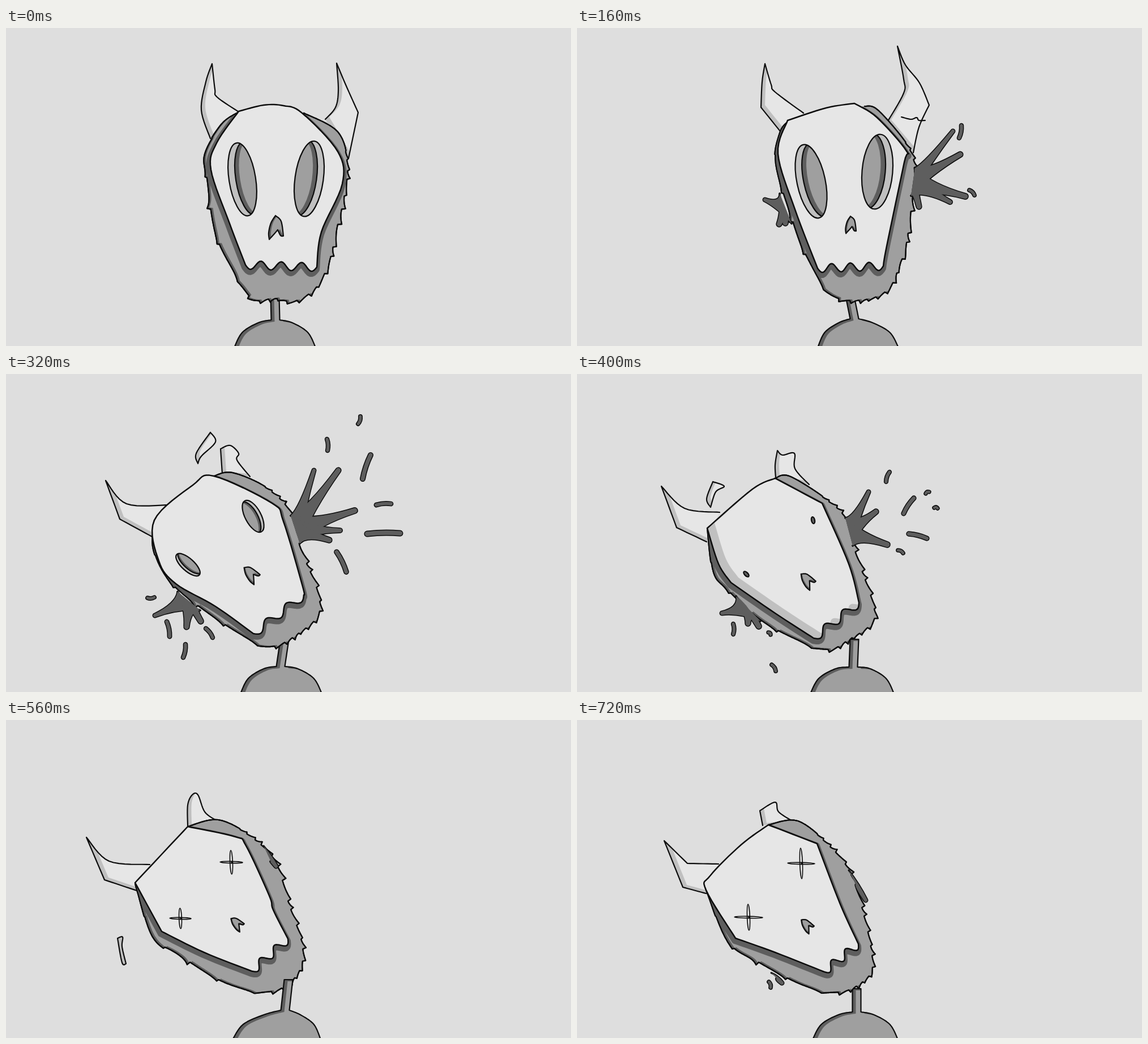
An HTML page with a canvas that plays this animation: 998x561 px, repeating every 0.8 s.

```html
<!DOCTYPE html>
<html lang="en">
<head>
<meta charset="utf-8">
<title>Horned skull</title>
<style>
html, body { margin: 0; width: 100%; height: 100%; overflow: hidden; background: #dedede; }
canvas { display: block; width: 100vw; height: 100vh; }
</style>
</head>
<body>
<canvas id="stage" width="998" height="561"></canvas>
<script>
const ctx = document.getElementById('stage').getContext('2d');
const INK = '#0c0c0c', BONE = '#e6e6e6', SHADE = '#c0c0c0', FUR = '#9f9f9f', DARK = '#5e5e5e';
const STEP = 80;
const NOSE = '0,-22! 10,-12 14,14! 9,13 4,3! -2,10 -11,20! -12,8 -8,-9 0,-22';

// Curves are a few "x,y" key points; "!" marks a sharp corner.
// mask: left mouth corner over the crown to the right one.   fur: right of the crown round to the left.
// body: left, right, neck foot x y, neck top x y.   nose: x, y, size, degrees.
// eye: x, y, rx, ry, degrees, rim shift.   cross: x, y, half width, half height.
// blood: two base points, then arm tips.   drops: tail and head in turn.
const calm = {
  hornL: '411,148 373,122 369,108 364,63! 353,95 345,145 361,195',
  hornR: '564,161 582,140 587,110 584,62! 600,100 622,149! 605,230',
  body: [403, 547, 476, 515, 475, 474],
  fur: '526,150 586,183 604,240 598,300 585,355 572,412 549,458 510,483 475,478 437,480 410,443 370,366 354,265 350,222 380,170 411,148',
  mask: '423,418 395,345 362,250 372,203 411,147! 455,136 490,137 523,150 586,218 594,275 557,360 549,422',
  teeth: 7,
  nose: [476, 353, 1, 0],
  eyeL: [417.5, 267, 23.5, 65, -9, 12],
  eyeR: [535.5, 266, 25, 67, 8, -12]
};

const struck = {
  hornL: '400,150 350,113 343,100 332,63! 327,95 325,140! 362,186',
  hornR: '548,166 577,115 577,90 566,32! 580,65 605,97 622,136! 604,175 594,220',
  crack: '573,157 590,161 600,158 604,163 615,163',
  body: [425, 568, 490, 513, 483, 478],
  fur: '508,138 532,145 585,208 597,250 590,330 581,390 572,415 552,460 510,480 450,472 403,400 378,335 350,240 358,185 372,165',
  mask: '425,424 385,320 355,222 372,163! 440,141 490,133! 530,158 582,217 578,237 547,385 541,420',
  teeth: 7,
  nose: [483, 348, 0.72, 0],
  eyeL: [413.5, 270.5, 25, 66, -12, 12],
  eyeR: [530.5, 253.5, 27, 66, 5, -13],
  blood: ['358,292 379,345 332,303 357,346 368,344', '597,247 590,296 664,182 677,223 686,297 659,307 604,315'],
  drops: '679,172 675,194 693,286 702,295'
};

const burst = {
  hornL: '340,192 295,172 254,124! 264,192! 307,237',
  hornR: '497,148 505,124! 527,128! 541,152 534,190',
  chip: '507,124! 509,110 484,44! 505,68 544,116! 530,127 507,124',
  body: [417, 546, 488, 514, 489, 478],
  fur: '450,144 465,139 492,143 540,195 550,230 559,300 574,365 568,430 540,460 490,478 432,457 382,405 320,322 303,280 305,235 318,207',
  mask: '443,448 345,330 318,250 318,207! 400,160 450,144! 528,209! 542,260 544,330 546,402',
  teeth: 5,
  nose: [479, 364, 0.7, -25],
  eyeL: [384, 305.5, 26, 88, -34, 10],
  eyeR: [484.5, 250, 24, 85, -20, -14],
  blood: ['320,335 356,378 279,300 256,364 225,408 328,444 341,410', '548,228 558,292 578,118 656,92 640,138 697,168 705,202 655,265 671,333'],
  drops: '714,94 706,122 612,138 614,161 745,235 731,236 709,313 697,307 602,315 583,302'
};

const tilt = {
  hornL: '288,231 213,229 176,188! 201,256! 258,287',
  hornR: '382,176 379,132! 396,126 411,140 408,152 431,181',
  chip: '339,158! 336,140 361,103! 370,120 345,145 339,158',
  body: [414, 558, 485, 516, 492, 469],
  fur: '367,180 400,174 460,200 503,243 522,310 550,378 553,425 515,460 475,481 436,472 360,425 290,368 260,310 262,258',
  mask: '437,458 370,410 300,370 270,330 262,258 330,196 367,180 470,228 490,260 524,375 526,390',
  teeth: 5,
  nose: [433, 354, 0.8, -45],
  eyeL: [321.5, 336.5, 11, 27, -48, 5],
  eyeR: [436.5, 251, 14, 31, -28, -6],
  blood: ['303,384 343,417 263,426 319,446 344,436', '503,250 519,299 544,170 587,170 616,241 590,276 571,293'],
  drops: '626,75 622,88 567,115 568,135 630,185 644,143 654,231 680,229 638,282 696,281 584,314 601,349 262,394 250,395 284,437 289,463 317,477 313,500 353,449 365,465'
};

const fall = {
  hornL: '252,244 190,237 149,198! 176,271! 229,296',
  hornR: '351,183 350,160 354,135! 363,143 384,140 385,167 410,195',
  chip: '236,235! 229,220 240,190! 260,198 245,208 236,235',
  body: [412, 560, 488, 517, 490, 468],
  fur: '350,184 375,180 437,218 476,255 494,318 524,405 522,440 480,470 443,487 385,468 320,432 264,380 240,350 230,272',
  mask: '418,466 350,422 272,368! 250,335 230,272! 310,203 350,184! 433,228! 480,335 498,403',
  teeth: 5,
  maskShade: true,
  nose: [407, 365, 0.75, -43],
  eyeL: [299, 353, 3, 6, -45, 0],
  eyeR: [417, 258, 3, 6, -12, 0],
  blood: ['281,392 324,436 256,422 302,440 321,445', '474,254 487,303 515,208 528,243 548,301'],
  drops: '546,190 552,173 577,246 595,219 616,211 622,208 631,236 637,237 586,282 618,290 567,311 576,316 276,441 276,459 338,456 342,460 344,513 351,524'
};

const limp = {
  hornL: '254,255 182,249 142,207! 174,282! 231,301',
  hornR: '321,187 321,150 329,132 339,132 351,162 371,177',
  chip: '197,385! 206,383 205,400 212,430! 205,428 197,385',
  body: [400, 556, 493, 512, 499, 458],
  neckInFront: true,
  fur: '321,188 375,176 433,205 477,250 500,322 525,400 515,450 468,480 388,465 300,412 258,383 232,303 228,287',
  mask: '434,443 350,410 275,373! 228,287! 321,188! 405,206 424,222 465,310 472,335 498,386',
  teeth: 5,
  nose: [408, 360, 0.65, -48],
  crossL: [308, 350, 19, 18],
  crossR: [398, 251, 20, 21],
  blood: ['455,222 468,250 477,258']
};

const still = {
  hornL: '250,254 195,253! 154,213! 187,295! 228,306',
  hornR: '328,186 323,160! 350,145 356,162 380,178',
  body: [416, 567, 494, 515, 494, 474],
  fur: '338,185 390,178 445,220 483,268 508,345 523,425 512,457 465,481 400,469 320,428 266,392 231,308 225,289',
  mask: '436,444 350,410 280,385! 228,300 235,275 290,220 338,185! 424,218! 465,325 497,395',
  teeth: 5,
  nose: [406, 363, 0.65, -43],
  crossL: [303, 348, 25, 23],
  crossR: [396, 253, 24, 27],
  blood: ['480,265 492,290 510,318', '343,446 352,455 362,464'],
  drops: '339,462 342,472'
};

const lerp = (a, b, t) => a + (b - a) * t;
const mix = (p, q, t) => [lerp(p[0], q[0], t), lerp(p[1], q[1], t)];
const points = text => text.split(' ').map(s => s.split(',').map(parseFloat));

// Unit normal: points outward on clockwise outlines.
function normal([x1, y1], [x2, y2]) {
  const len = Math.hypot(x2 - x1, y2 - y1) || 1;
  return [(y2 - y1) / len, (x1 - x2) / len];
}

const push = ([x, y], [nx, ny], d) => [x + nx * d, y + ny * d];

function seeded(seed) {
  return () => (seed = seed * 16807 % 2147483647) / 2147483647;
}

// Turn key points into a fine polyline.
function flatten(curve) {
  if (typeof curve !== 'string') return curve;
  const pts = points(curve), sharp = curve.split(' ').map(s => s.endsWith('!')), out = [];
  for (let i = 0; i < pts.length - 1; i++) {
    const b = pts[i], c = pts[i + 1];
    const a = sharp[i] || !i ? b : pts[i - 1], d = sharp[i + 1] ? c : pts[i + 2] || c;
    for (let u = 0; u < 1; u += 0.125) {
      const v = 1 - u;
      out.push([0, 1].map(k => v * v * v * b[k] + u * u * u * c[k] +
        3 * v * u * (v * (b[k] + (c[k] - a[k]) / 6) + u * (c[k] - (d[k] - b[k]) / 6))));
    }
  }
  return [...out, pts[pts.length - 1]];
}

function resample(pts, count) {
  const at = [0];
  for (let i = 1; i < pts.length; i++)
    at.push(at[i - 1] + Math.hypot(pts[i][0] - pts[i - 1][0], pts[i][1] - pts[i - 1][1]));
  let i = 1;
  return Array.from({ length: count }, (_, k) => {
    const want = at[at.length - 1] * k / (count - 1);
    while (i < pts.length - 1 && at[i] < want) i++;
    return mix(pts[i - 1], pts[i], (want - at[i - 1]) / (at[i] - at[i - 1] || 1));
  });
}

// In-between pose from the parts two poses share.
function between(a, b) {
  const pose = { teeth: a.teeth };
  for (const key in a) {
    if (!(key in b) || ['blood', 'drops', 'teeth'].includes(key)) continue;
    if (typeof a[key] === 'string') {
      const q = resample(flatten(b[key]), 300);
      pose[key] = resample(flatten(a[key]), 300).map((p, i) => mix(p, q[i], 0.5));
    } else pose[key] = a[key].map((v, i) => lerp(v, b[key][i], 0.5));
  }
  return pose;
}

// Hair tufts: dense on the right and chin, sparse up the left side.
function tufted(curve) {
  const count = 400, pts = resample(flatten(curve), count), rand = seeded(77);
  for (let i = 50; i < 360;) {
    const left = i > count * 0.58, span = Math.round((left ? 26 : 7) + rand() * 12), height = 3 + rand() * 5;
    const base = pts.slice(i, i + span + 1);
    for (let k = 0; k < span; k++) {
      const u = k / span;
      pts[i + k] = push(base[k], normal(base[k], base[k + 1]), height * (left ? (1 - u) ** 6 : u * u) - 1);
    }
    i += span;
  }
  return pts;
}

// The mouth is a wave between the two ends of the mask outline.
function withMouth(curve, teeth) {
  const pts = flatten(curve), from = pts[pts.length - 1], to = pts[0], n = normal(from, to), mouth = [];
  for (let u = 0; u <= 1; u += 0.02) mouth.push(push(mix(from, to, u), n, 7.5 * Math.sin(Math.PI * teeth * u)));
  return [...pts, ...mouth];
}

function bodyCurve([left, right, x, y, topX, topY]) {
  const w = 7.5, slope = (edge, foot) => [[0.22, 537], [0.65, 520]].map(([t, h]) => `${lerp(edge, foot, t)},${h}`);
  return [`${left},564`, ...slope(left, x - w), `${x - w},${y}!`, `${topX - w},${topY}!`,
    `${topX + w},${topY}!`, `${x + w},${y}!`, ...slope(right, x + w).reverse(), `${right},564`].join(' ');
}

function trace(curve, close) {
  const path = new Path2D();
  flatten(curve).forEach(([x, y]) => path.lineTo(x, y));
  if (close) path.closePath();
  return path;
}

function fill(path, color) { ctx.fillStyle = color; ctx.fill(path); }

function ink(path, width = 2.2, color = INK) {
  ctx.strokeStyle = color;
  ctx.lineWidth = width;
  ctx.stroke(path);
}

function inside(path, draw) {
  ctx.save();
  ctx.clip(path);
  draw();
  ctx.restore();
}

function placed(x, y, deg, draw) {
  ctx.save();
  ctx.translate(x, y);
  ctx.rotate(deg * Math.PI / 180);
  draw();
  ctx.restore();
}

function shaded(path, dark, light, dx, dy, width) {
  fill(path, dark);
  inside(path, () => { ctx.translate(dx, dy); fill(path, light); });
  ink(path, width);
}

function drawEye([x, y, rx, ry, deg, shift]) {
  const oval = new Path2D();
  oval.ellipse(0, 0, rx, ry, 0, 0, 7);
  placed(x, y, deg, () => {
    fill(oval, shift ? SHADE : DARK);
    if (shift) inside(oval, () => {
      ctx.translate(shift, 0);
      fill(oval, DARK);
      inside(oval, () => { ctx.translate(Math.sign(shift) * rx * 0.32, 0); fill(oval, FUR); });
      ink(oval);
    });
    ink(oval);
  });
}

function drawCross([x, y, w, h]) {
  const loops = new Path2D();
  loops.ellipse(x, y, w, 1.6, 0.02, 0, 7);
  loops.moveTo(x, y);
  loops.ellipse(x, y, 2.4, h, -0.04, 0, 7);
  ink(loops, 1.6);
}

// Arms share one base and taper to round tips; inking first merges their outlines.
function drawBlood(text) {
  const [p, q, ...tips] = points(text), mid = mix(p, q, 0.5), rand = seeded(5);
  const arms = tips.map(tip => {
    let n = normal(mid, tip);
    const side = n[0] * (p[0] - q[0]) + n[1] * (p[1] - q[1]) < 0 ? -1 : 1;
    n = n.map(v => v * side);
    const r = 3 + rand() * 1.8, bend = mix(mid, tip, 0.35), path = new Path2D(), angle = Math.atan2(n[1], n[0]);
    path.moveTo(...p);
    path.quadraticCurveTo(...push(bend, n, 5), ...push(tip, n, r));
    path.arc(...tip, r, angle, angle + Math.PI, side < 0);
    path.quadraticCurveTo(...push(bend, n, -5), ...q);
    return path;
  });
  arms.forEach(arm => ink(arm, 3));
  arms.forEach(arm => fill(arm, DARK));
}

function drawDrops(text) {
  const pts = points(text);
  for (let i = 0; i < pts.length; i += 2) {
    const tail = pts[i], head = pts[i + 1], path = new Path2D();
    const width = 4 + Math.hypot(head[0] - tail[0], head[1] - tail[1]) * 0.07;
    path.moveTo(...tail);
    path.quadraticCurveTo(...push(mix(tail, head, 0.5), normal(tail, head), 3), ...head);
    ink(path, width + 3);
    ink(path, width, DARK);
  }
}

function drawPose(pose) {
  const body = () => shaded(trace(bodyCurve(pose.body)), DARK, FUR, 6, 3);
  ctx.fillStyle = '#dedede';
  ctx.fillRect(0, 0, 998, 561);
  for (const key of ['hornL', 'hornR', 'chip'])
    if (pose[key]) shaded(trace(pose[key]), SHADE, BONE, 7, -4);
  if (pose.crack) ink(trace(pose.crack));
  if (!pose.neckInFront) body();

  const fur = trace(tufted(pose.fur)), mask = trace(withMouth(pose.mask, pose.teeth), true);
  shaded(fur, DARK, FUR, 4, -2);
  inside(fur, () => { ctx.translate(-1, 4); ink(mask, 12, DARK); });
  ink(fur);
  if (pose.neckInFront) body();
  (pose.blood || []).forEach(drawBlood);

  if (pose.maskShade) shaded(mask, SHADE, BONE, 13, -9, 2.5);
  else { fill(mask, BONE); ink(mask, 2.5); }
  for (const key of ['eyeL', 'eyeR']) if (pose[key]) drawEye(pose[key]);
  for (const key of ['crossL', 'crossR']) if (pose[key]) drawCross(pose[key]);
  const [x, y, size, deg] = pose.nose;
  placed(x, y, deg, () => {
    ctx.scale(size, size);
    shaded(trace(NOSE), DARK, FUR, 4, -1, 2.2 / size);
  });
  if (pose.drops) drawDrops(pose.drops);
}

const { crossL, crossR } = limp;
const poses = [
  calm, between(calm, struck), struck, burst, tilt, fall,
  { ...between(fall, limp), crossL, crossR }, limp, between(limp, still), still
];
ctx.lineJoin = ctx.lineCap = 'round';

const start = performance.now();
let shown = -1;
function tick() {
  const index = Math.floor((performance.now() - start) / STEP) % poses.length;
  if (index !== shown) drawPose(poses[shown = index]);
  requestAnimationFrame(tick);
}
tick();
</script>
</body>
</html>
```
